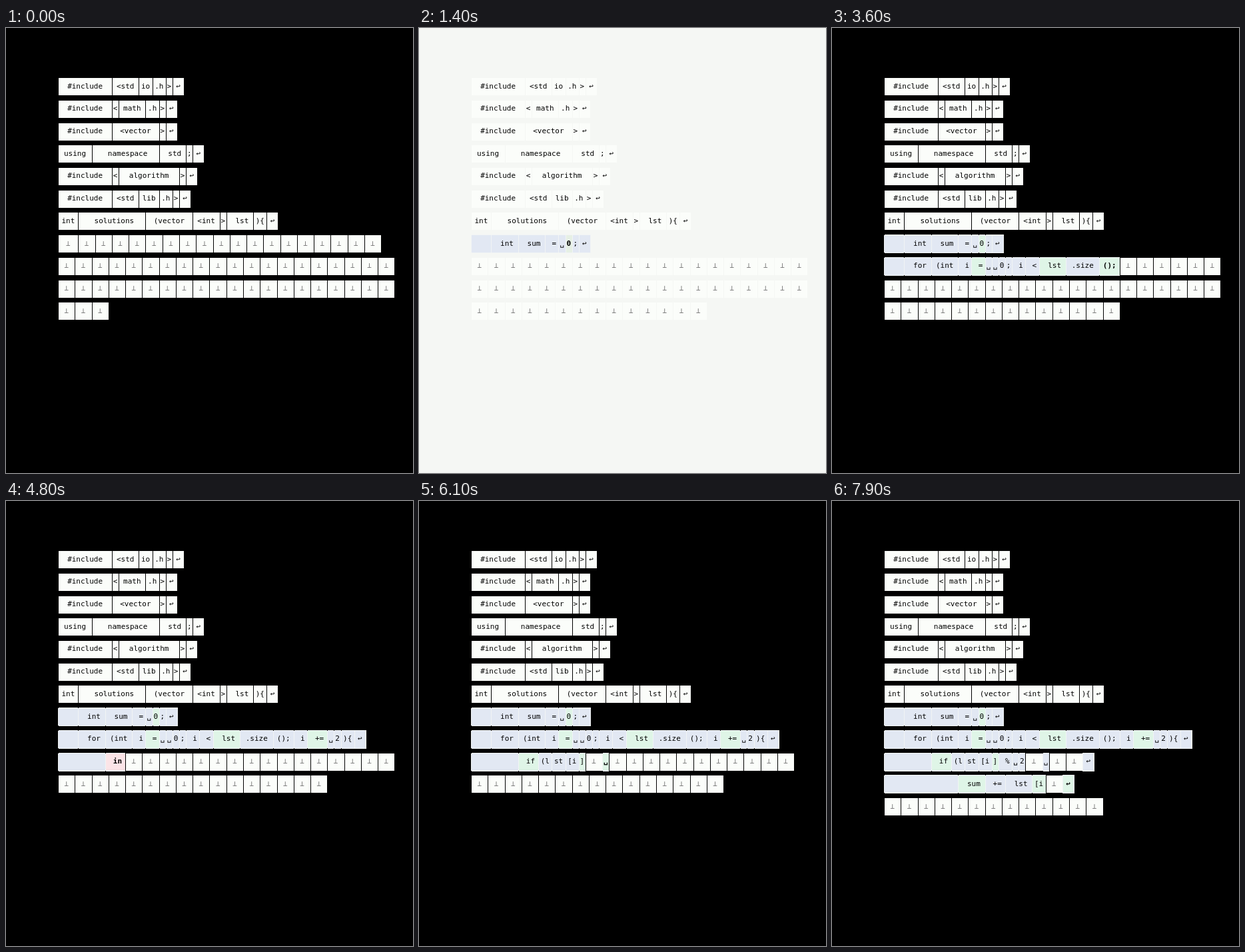
An HTML page that plays this animation: 611 by 668 pixels, repeating every 8000 ms.

```html
<!DOCTYPE html>
<html lang="en">
<head>
<meta charset="utf-8">
<style>
  html, body { margin: 0; width: 100%; height: 100%; overflow: hidden; }
  #stage { position: absolute; width: 611px; height: 668px; overflow: hidden; background: #000; }
  #stage.light { background: #f5f7f4; }
  .cell { position: absolute; height: 26px; background: #fbfdfa; color: #000; }
  .text {
    position: absolute; white-space: pre;
    font: 11px/25px "DejaVu Sans Mono", monospace;
  }
  .mask { color: #777; }
  .code, .fix, .bad { box-shadow: -1px 0 #f1f4f5, 0 1px #f1f4f5, 0 -1px #f1f4f5; }
  .code.end, .fix.end { box-shadow: 0 0 0 1px #f1f4f5; }
  .code { background: #e2e8f3; }
  .fix { background: #dff5e7; }
  .bad { background: #fbe4e7; }
  .light .fix { background: #e6f0e5; }
  .now { font-weight: bold; }
  .now .text { font-weight: bold; }
</style>
</head>
<body>
<div id="stage"></div>
<script>
const LOOP = 8000, STEP = 100, SLOTS = 62;
const LEFT = 78.6, TOP = 75.1, PITCH = 33.72, MAX_WIDTH = 506;
const CHAR = 10.105, MASK_WIDTH = 2.5 * CHAR, RETURN_WIDTH = 17;
const GLYPH = 6.62, TEXT_SHIFT = -0.4;
const MASK = '⊥', RETURN = '↩';
const stage = document.getElementById('stage');

// Tokens are separated by "|"; leading blanks belong to the token.
const prompt = [
  '#include|<std|io|.h|>|↩', '#include|<|math|.h|>|↩', '#include|<vector|>|↩',
  'using| namespace| std|;|↩', '#include|<|algorithm|>|↩',
  '#include|<std|lib|.h|>|↩', 'int| solutions|(vector|<int|>| lst|){|↩'
].join('|').split('|');

const answer = [
  '   | int| sum| =|␣|0|;|↩',
  '   | for|(int| i| =|␣|␣|0|;| i| <| lst|.size|();| i| +=|␣|2|){|↩',
  '       | if|(l|st|[i|]| %|␣|2|⊥|␣|⊥|⊥|↩',
  '           | sum| +=| lst|[i|⊥|↩'
].join('|').split('|');

// Each pass repairs the previous wrong guess first and ends with a new one.
const passes = [
  { start: 300, order: [0, 1, 2, 3, 4, 7, 6, 5], wrong: '1' },
  { start: 1400, order: [5, 8, 9, 10, 11, 12], wrong: ' i' },
  { start: 2300, order: [12, 13, 14, 15, 16, 17, 18, 19], wrong: ' sum' },
  { start: 3400, order: [19, 20, 21, 22, 24, 25, 23], wrong: ' ++' },
  { start: 4400, order: [23, 26, 27, 28, 29], wrong: ' in' },
  { start: 5200, order: [29, 31, 30, 32, 33], wrong: ';' },
  { start: 6000, order: [33, 35, 34, 36, 41, 38, 44, 43], wrong: ' lst' },
  { start: 7100, order: [43, 45, 46], wrong: ');' },
  { start: 7700, order: [46, 42, 48] }
];
const flashes = [1400, 5200, 6000];

function slotsAt(time) {
  const slots = Array.from({ length: SLOTS }, () => ({ text: MASK, kind: 'mask' }));
  let latest = null;
  passes.forEach(({ start, order, wrong }, p) => order.forEach((slot, k) => {
    if (time < start + k * STEP) return;
    const isWrong = wrong && k === order.length - 1;
    const kind = isWrong ? 'bad' : p && k === 0 ? 'fix' : 'code';
    latest = slots[slot] = { text: isWrong ? wrong : answer[slot], kind };
  }));
  if (latest) {
    if (latest.kind === 'code') latest.kind = 'fix';
    latest.kind += ' now';
  } else {
    slots[0].width = 3 * CHAR;
  }
  return slots;
}

function widthOf({ text, width }) {
  if (width) return width;
  if (text === MASK) return MASK_WIDTH;
  return text === RETURN ? RETURN_WIDTH : text.length * CHAR;
}

function element(className, left, top) {
  const node = document.createElement('span');
  node.className = className;
  node.style.left = left + 'px';
  node.style.top = top + 'px';
  return node;
}

// Boxes sit on whole pixels; their text keeps the fractional centre.
function makeCell({ text, kind }, x, y, width) {
  const left = Math.floor(x) + 1, top = Math.round(y);
  const cell = element(`cell ${kind} ${text === RETURN ? 'end' : ''}`, left, top);
  cell.style.width = Math.floor(x + width) - left + 'px';
  const textX = x + (width - text.length * GLYPH) / 2 + TEXT_SHIFT;
  const label = element('text', textX - left, Math.floor(y) - top);
  label.textContent = text;
  cell.append(label);
  return cell;
}

function draw(time) {
  let x = 0, row = 0;
  const tokens = [...prompt.map(text => ({ text, kind: '' })), ...slotsAt(time)];
  const cells = tokens.map(token => {
    const width = widthOf(token);
    if (x + width > MAX_WIDTH) { x = 0; row++; }
    const cell = makeCell(token, LEFT + x, TOP + row * PITCH, width);
    x += width;
    if (token.text === RETURN) { x = 0; row++; }
    return cell;
  });
  stage.className = flashes.includes(time) ? 'light' : '';
  stage.replaceChildren(...cells);
}

const origin = performance.now();
let shown = -1;
function tick() {
  const elapsed = (performance.now() - origin) % LOOP;
  const time = Math.floor(elapsed / STEP) * STEP;
  if (time !== shown) draw(shown = time);
  requestAnimationFrame(tick);
}
tick();
</script>
</body>
</html>
```
